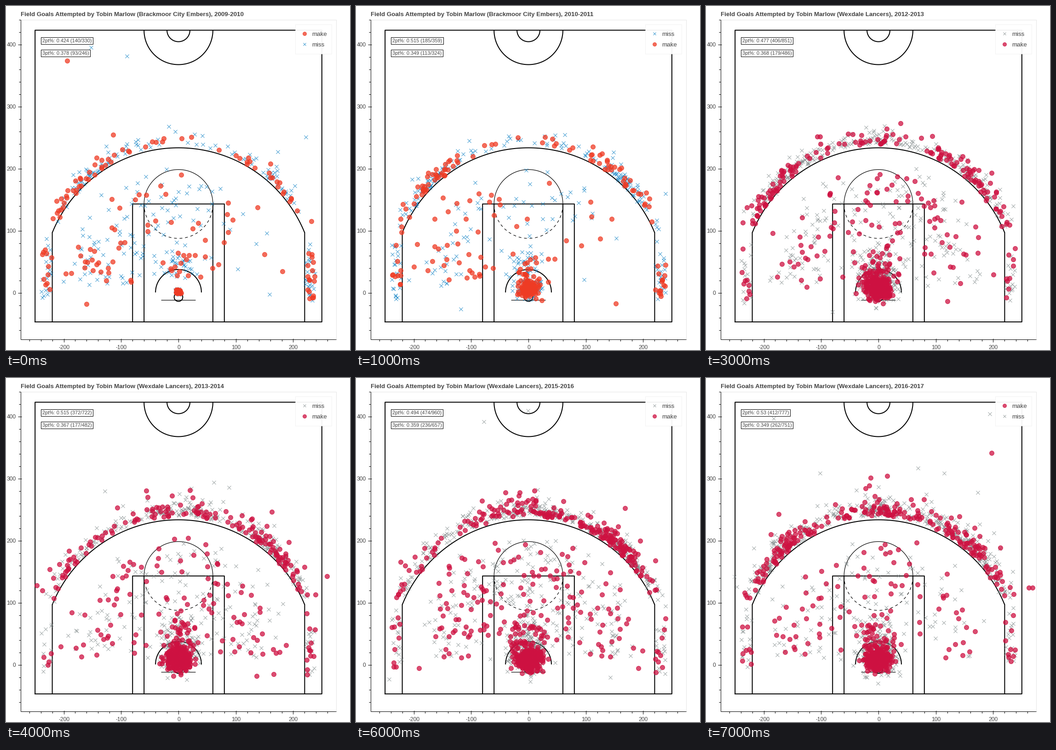
A matplotlib script that plays this animation: 748x748 px, repeating every 8000 ms.

```python
import numpy as np
import matplotlib.pyplot as plt
from matplotlib.animation import FuncAnimation
from matplotlib.patches import Rectangle

SIZE, DPI = 748, 64
PX = 72 / DPI                      # points per pixel
KX, KY = 686 / 550, 695 / 515      # pixels per court unit
INK, PALE = "#444444", "#e5e5e5"
PLAYER = "Tobin Marlow"
CITY, LANCERS = "Brackmoor City Embers", "Wexdale Lancers"
COLORS = {CITY: ("#ef3b24", "#007ac1"), LANCERS: ("#ce1141", "#7f8889")}

plt.rcParams["font.family"] = "Liberation Sans"


def sx(x):
    return 375 + KX * np.asarray(x)


def sy(y):
    return 29 + KY * (440 - np.asarray(y))


def polar(r, degrees):
    t = np.radians(degrees)
    return r * np.cos(t), r * np.sin(t)


class Season:
    """One season's shots, scattered by zone.

    two, three: (made, tried).  mid: share of twos made from midrange.
    corner: share of threes from the corners.
    wings: share of arc shots gathered at the left, top and right.
    skew: below 1 moves midrange shots to the left.  rim: spread at the rim.
    made, missed: a few shots far from the usual spots.
    """

    def __init__(self, year, team, two, three, mid, corner, wings, skew=1.0,
                 rim=11.5, deep=5.0, make_first=False, made=(), missed=()):
        self.year, self.team, self.make_first = year, team, make_first
        self.two, self.three = two, three
        self.corner, self.wings, self.skew, self.deep = corner, wings, skew, deep
        self.rng = np.random.default_rng(year)
        self.makes = self.shots(two[0], three[0], mid, 0.1, rim, made)
        self.misses = self.shots(two[1] - two[0], three[1] - three[0],
                                 1.5 * mid, 0.2, 1.5 * rim, missed)

    def arc(self, n):
        rng = self.rng
        left, top, right = self.wings
        center = rng.choice([132, 90, 50, 0], n,
                            p=[left, top, right, 1 - left - top - right])
        angle = np.where(center, rng.normal(center, 9), rng.uniform(25, 155, n))
        return polar(238 + rng.gamma(2.3, self.deep, n), angle)

    def corners(self, n):
        rng = self.rng
        side = np.where(rng.random(n) < 0.42, -1, 1)
        return side * rng.uniform(221, 239, n), rng.triangular(-20, 10, 98, n)

    def midrange(self, n):
        angle = 4 + 172 * self.rng.random(n) ** self.skew
        return polar(self.rng.triangular(60, 165, 218, n), angle)

    def shots(self, twos, threes, mid, paint, spread, far):
        rng = self.rng
        mid, paint = round(twos * mid), round(twos * paint)
        corner = round(threes * self.corner)
        rim = twos - mid - paint
        parts = [
            (rng.normal(0, spread, rim),
             rng.normal(0.7 * spread, 0.8 * spread, rim)),
            (rng.normal(0, 19, paint), rng.triangular(22, 32, 85, paint)),
            self.midrange(mid),
            self.corners(corner),
            self.arc(threes - corner),
            np.array(far).T,
        ]
        x, y = np.hstack(parts)
        return sx(x), sy(y)

    def title(self):
        return (f"Field Goals Attempted by {PLAYER} ({self.team}), "
                f"{self.year}-{self.year + 1}")


def rate(kind, shots):
    made, tried = shots
    return f"{kind}pt%: {round(made / tried, 3)} ({made}/{tried})"


SEASONS = [
    Season(2009, CITY, (140, 330), (93, 246), mid=.36, corner=.3,
           wings=(.4, 0, .25), skew=.5, rim=1.6, deep=4, make_first=True,
           made=[(-194, 373), (-114, 254), (-160, -19), (181, 34)],
           missed=[(-90, 381), (-152, 395), (222, 250), (159, -3)]),
    Season(2010, CITY, (185, 359), (113, 324), mid=.25, corner=.22,
           wings=(.3, 0, .3), skew=.6, rim=9, deep=4,
           made=[(152, -18)], missed=[(-118, -27)]),
    Season(2011, CITY, (195, 337), (114, 291), mid=.17, corner=.18,
           wings=(.25, 0, .4), skew=.65, deep=4,
           made=[(-9, 272), (7, 183), (187, -6)],
           missed=[(88, 407), (-68, 298), (192, 222), (136, -46)]),
    Season(2012, LANCERS, (406, 851), (179, 486), mid=.22, corner=.1,
           wings=(.2, .15, .2),
           made=[(120, -14)], missed=[(-80, -31)]),
    Season(2013, LANCERS, (372, 722), (177, 482), mid=.25, corner=.09,
           wings=(.05, .2, .25),
           made=[(-56, 280), (163, 246), (136, -19), (166, -16)],
           missed=[(62, 293), (88, 285), (-128, 279), (-19, -22)]),
    Season(2014, LANCERS, (439, 915), (208, 554), mid=.26, corner=.15,
           wings=(.1, .25, .2),
           made=[(4, 279), (-191, -10), (192, -16), (236, -36)],
           missed=[(-193, 369), (1, 345), (-19, 299), (157, -24)]),
    Season(2015, LANCERS, (474, 960), (236, 657), mid=.28, corner=.08,
           wings=(.05, .2, .35),
           made=[(-40, 277), (168, 252), (-191, -6), (192, -6)],
           missed=[(-1, 409), (-78, 391), (143, -21), (-243, -24)]),
    Season(2016, LANCERS, (412, 777), (262, 751), mid=.18, corner=.07,
           wings=(.2, .2, .25), deep=6, make_first=True,
           made=[(197, 341), (15, 304), (-14, 301), (-174, 242)],
           missed=[(194, 404), (-183, 396), (69, 316), (-102, 308),
                   (115, 308), (173, 277)]),
]

fig = plt.figure(figsize=(SIZE / DPI, SIZE / DPI), dpi=DPI, facecolor="white")
ax = fig.add_axes([0, 0, 1, 1])
ax.set(xlim=(0, SIZE), ylim=(SIZE, 0))
ax.axis("off")


def stroke(x, y, width=1, color="black", **kw):
    ax.plot(x, y, color=color, lw=width * PX, solid_capstyle="butt", **kw)


def label(x, y, text="", size=12, **kw):
    kw.setdefault("va", "center_baseline")
    return ax.text(x, y, text, fontsize=size * PX, color=INK, **kw)


def court(points, width=2):
    x, y = zip(*points)
    stroke(sx(x), sy(y), width, snap=False)


def arc(cy, r, start, end, width=2, **kw):
    x, y = polar(r * KX, np.linspace(start, end, 121))
    stroke(sx(0) + x, sy(cy) - y, width, **kw)


def draw_axes():
    stroke([32.5, 718.5, 718.5], [29.5, 29.5, 724.5], color=PALE)
    stroke([32.5, 32.5], [29.5, 724.5])
    stroke([32.5, 718.5], [724.5, 724.5])
    for v in range(-260, 441, 20):
        major = v % 100 == 0
        inner, outer = (2, 6) if major else (0, 4)
        if v <= 260:
            x = np.round(sx(v)) + 0.5
            stroke([x, x], [724.5 - inner, 724.5 + outer])
            if major:
                label(x, 741, str(v), ha="center")
        if v >= -60:
            y = np.round(sy(v)) + 0.5
            stroke([32.5 + inner, 32.5 - outer], [y, y])
            if major:
                label(21.5, y, str(v), ha="right")


def draw_court():
    court([(-250, -47.5), (-250, 422.5), (250, 422.5), (250, -47.5),
           (-250, -47.5), (-249, -47.5)])
    court([(-80, -47.5), (-80, 142.5), (80, 142.5), (80, -47.5)])
    for side in (-1, 1):
        court([(60 * side, -47.5), (60 * side, 142.5)])
        court([(220 * side, -47.5), (220 * side, 97)])
    court([(-30, -12.5), (30, -12.5)], 1.2)
    arc(13.5, 237.5, 22.2, 157.8)
    arc(-7.5, 7.5, 0, 360)
    arc(0, 40, 0, 180)
    arc(142.5, 60, 0, 180, 1.2)
    arc(142.5, 60, 180, 360, 1.2, dashes=(5, 5))
    arc(422.5, 60, 180, 360)
    arc(422.5, 20, 180, 360)


def markers(shape, size, zorder):
    return ax.plot([], [], shape, ls="", ms=size * PX, mew=PX, alpha=.75,
                   zorder=zorder)[0]


draw_axes()
draw_court()
misses, makes = markers("x", 7.5, 4), markers("o", 10, 5)
ax.add_patch(Rectangle((629.5, 39.5), 79, 64, fc=(1, 1, 1, .95),
                       ec=(.9, .9, .9, .5), lw=PX, zorder=6))
key_miss, key_make = markers("x", 6.5, 7), markers("o", 8, 7)
name_miss = label(665, 0, "miss", 13.33, zorder=7)
name_make = label(665, 0, "make", 13.33, zorder=7)
title = label(32.5, 17, size=13.33, weight="bold")
frame = dict(fc="white", ec="black", lw=PX, pad=2.6 * PX)
rate2, rate3 = [label(79, y, size=10.9, va="center", zorder=8, bbox=frame)
                for y in (75.8, 102.8)]


def show(i):
    s = SEASONS[i]
    make_y, miss_y = (60, 83) if s.make_first else (83, 60)
    make_color, miss_color = COLORS[s.team]
    for dots, key, name, shots, y, color in (
            (makes, key_make, name_make, s.makes, make_y, make_color),
            (misses, key_miss, name_miss, s.misses, miss_y, miss_color)):
        dots.set_data(*shots)
        dots.set_color(color)
        key.set_data([649.5], [y])
        key.set_color(color)
        name.set_y(y)
    title.set_text(s.title())
    rate2.set_text(rate(2, s.two))
    rate3.set_text(rate(3, s.three))
    return makes, misses


anim = FuncAnimation(fig, show, frames=len(SEASONS), interval=1000,
                     init_func=lambda: show(0), repeat=True, blit=False)
plt.show()
```
